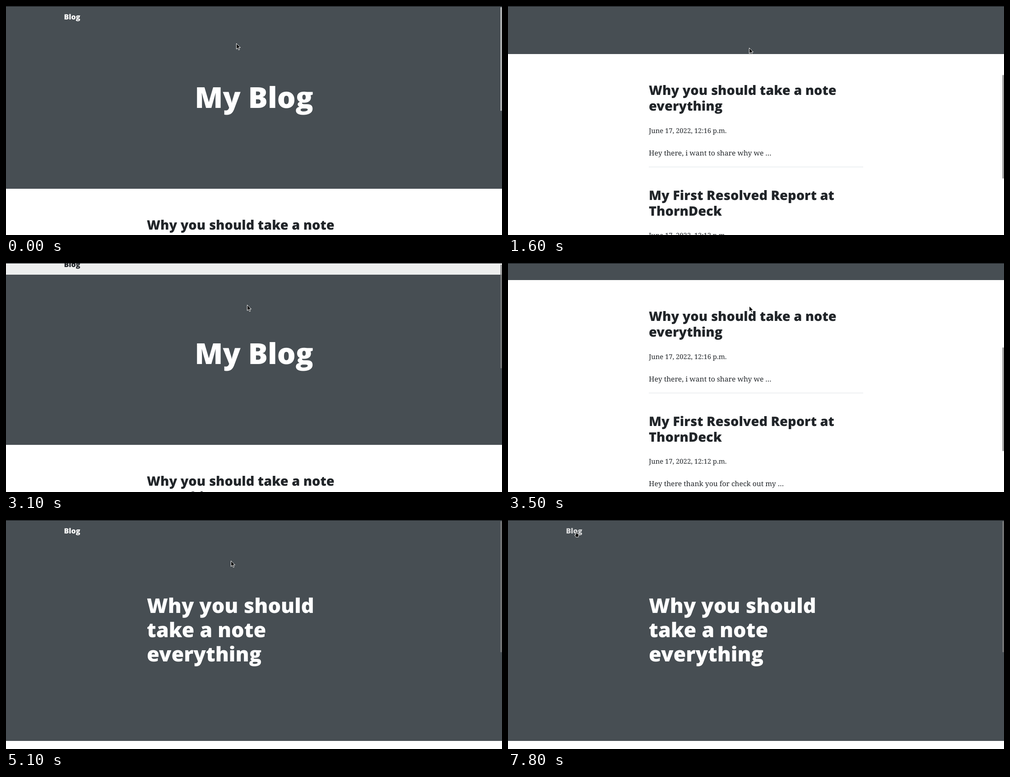
These frames come from a looping animation (1099 px wide and 510 px high, 8000 ms). An HTML page:

```html
<!DOCTYPE html>
<html lang="en">
<head>
<meta charset="utf-8">
<title>My Blog</title>
<style>
  html, body { margin: 0; width: 100%; height: 100%; overflow: hidden; background: #fff; }
  svg { display: block; }
  text { text-rendering: geometricPrecision; fill: #212529; font: 15.65px "Noto Serif", serif; }
  .heading, .title, .lead, .brand { font-family: "Open Sans", sans-serif; font-weight: 800; }
  .heading { font-size: 64.4px; fill: #fff; text-anchor: middle; }
  .lead { font-size: 45.05px; fill: #fff; }
  .title { font-size: 28.96px; }
  .brand { font-size: 16.1px; fill: #fff; }
  .date { font-size: 14.8px; }
  .copyright { font-size: 13.6px; font-style: italic; fill: #6c757d; text-anchor: middle; }
  .hover text { fill: #0085a1; }
  .dark { fill: #474e53; }
  .rule { fill: #dee2e6; }
  #statusText { font: 9.65px "Noto Sans", sans-serif; fill: #f4f4f4; }
  #cursor path { fill: #000; stroke: #fff; stroke-width: 1; stroke-linejoin: round; }
</style>
</head>
<body>
<svg width="1099" height="510" viewBox="0 0 1099 510">
  <defs>
    <g id="footer">
      <rect class="rule" width="1099" height="1"/>
      <circle cx="549" cy="60" r="20" fill="#212529"/>
      <circle cx="549" cy="60" r="10" fill="#fff"/>
      <text class="copyright" x="549" y="108">Copyright © duskmoor48 2022</text>
    </g>
  </defs>

  <g id="home">
    <rect class="dark" width="1099" height="407"/>
    <text class="brand" id="homeBrand" x="128.5" y="30">Blog</text>
    <text class="heading" x="549.5" y="227">My Blog</text>
    <g id="firstPost">
      <text class="title" x="312" y="498">Why you should take a note</text>
      <text class="title" x="312" y="533">everything</text>
      <text class="date" x="312" y="583">June 17, 2022, 12:16 p.m.</text>
      <text x="312" y="633">Hey there, i want to share why we …</text>
    </g>
    <rect class="rule" x="312" y="658" width="475" height="1"/>
    <text class="title" x="312" y="732">My First Resolved Report at</text>
    <text class="title" x="312" y="767">ThornDeck</text>
    <text class="date" x="312" y="816">June 17, 2022, 12:12 p.m.</text>
    <text x="312" y="866">Hey there thank you for check out my …</text>
    <rect class="rule" x="312" y="892" width="475" height="1"/>
    <use href="#footer" y="912"/>
  </g>

  <g id="post">
    <rect class="dark" width="1099" height="492"/>
    <text class="brand" id="postBrand" x="128.5" y="30">Blog</text>
    <text class="lead" x="312" y="207">Why you should</text>
    <text class="lead" x="312" y="261">take a note</text>
    <text class="lead" x="312" y="315">everything</text>
    <text class="date" x="312" y="576">June 17, 2022, 12:16 p.m.</text>
    <text x="312" y="626">Hey there, i want to share why we must take a not everything</text>
    <text x="312" y="650">happend on our target program</text>
    <use href="#footer" y="701"/>
  </g>

  <g id="stickyNav">
    <rect width="1099" height="26" fill="#edeeee"/>
    <text class="brand" x="128.5" y="9" style="fill:#212529">Blog</text>
  </g>

  <rect id="thumb" x="1095.7" width="2.6" rx="1.3"/>
  <g id="status">
    <path d="M0 494H209.5q2.5 0 2.5 2.5V510H0z" fill="#2e2d2e"/>
    <text id="statusText" x="2" y="507"></text>
  </g>
  <rect width="1099" height="1" fill="#0b0d0f"/>
  <g id="cursor">
    <path id="arrow" d="M0 .4V13L2.9 10.3 5.1 15 7.1 14.1 5 9.6H8.9z"/>
    <path id="hand" d="M2.5 7V1.2q1.1-1.4 2.2 0V5L8 5.7q1.3.4 1.2 2L8.5 13H3L.3 9q-.4-2 2.2-.4z"/>
  </g>
</svg>
<script>
const LOOP = 8000;
const el = id => document.getElementById(id);
const show = (id, on) => el(id).setAttribute("display", on ? "inline" : "none");
const move = (id, x, y) => el(id).setAttribute("transform", `translate(${x} ${y})`);

// Each row: start time, then values held until the next row.
const cursorSteps = [
  [0, 510.5, 83], [100, 522.5, 88.5], [300, 528, 98.5], [500, 534.5, 93], [3500, 534.5, 95.5],
  [3700, 475, 125, "hand"], [3900, 472, 127, "hand"], [4100, 495, 97],
  [4600, 498.5, 90.5], [7500, 179.5, 68.5], [7800, 147.5, 25, "hand"]
];
const statusSteps = [
  [0, ""], [3900, "192.0.2.1/why-you-should-take-a-note"], [4100, "Waiting for 192.0.2.1…"],
  [4600, "Transferring data from 192.0.2.1…"], [5100, ""]
];
const jumps = [[1900, 553], [3100, 2], [3500, 369], [4800, 0], [5900, 40], [6200, 342], [7200, 0]];
const wheel = [[400, 0], [500, 14], [1100, 176], [1300, 214], [1500, 214], [1600, 300], [1800, 490], [1900, 553]];

const held = (steps, t) => steps.findLast(s => s[0] <= t);

function scrollAt(t) {
  if (t >= 1900) return held(jumps, t)[1];
  const tick = Math.floor(t / 100) * 100;
  if (tick <= 400) return 0;
  const i = wheel.findIndex(k => k[0] >= tick);
  const [t0, y0] = wheel[i - 1], [t1, y1] = wheel[i];
  return Math.round(y0 + (y1 - y0) * (tick - t0) / (t1 - t0));
}

function render(t) {
  const onPost = t >= 4800, sticky = t >= 3100 && t < 3500;
  const scroll = scrollAt(t);
  show("home", !onPost);
  show("post", onPost);
  show("stickyNav", sticky);
  show("homeBrand", !sticky);
  move("home", 0, -scroll);
  move("post", 0, -scroll);
  el("firstPost").setAttribute("class", t >= 3700 && !onPost ? "hover" : "");
  el("postBrand").style.fill = t >= 7800 ? "#dadbdc" : "#fff";

  const thumb = el("thumb");
  thumb.setAttribute("y", 2.5 + scroll * (onPost ? 0.635 : 0.503));
  thumb.setAttribute("height", onPost ? 292 : 231);
  thumb.setAttribute("fill", t < 500 ? "#d0d0d0" : "#828282");

  const message = held(statusSteps, t)[1];
  show("status", message);
  el("statusText").textContent = message;

  const [, x, y, shape = "arrow"] = held(cursorSteps, t);
  move("cursor", x, y);
  show("arrow", shape === "arrow");
  show("hand", shape === "hand");
}

const start = performance.now();
function loop() {
  render((performance.now() - start) % LOOP);
  requestAnimationFrame(loop);
}
loop();
</script>
</body>
</html>
```
